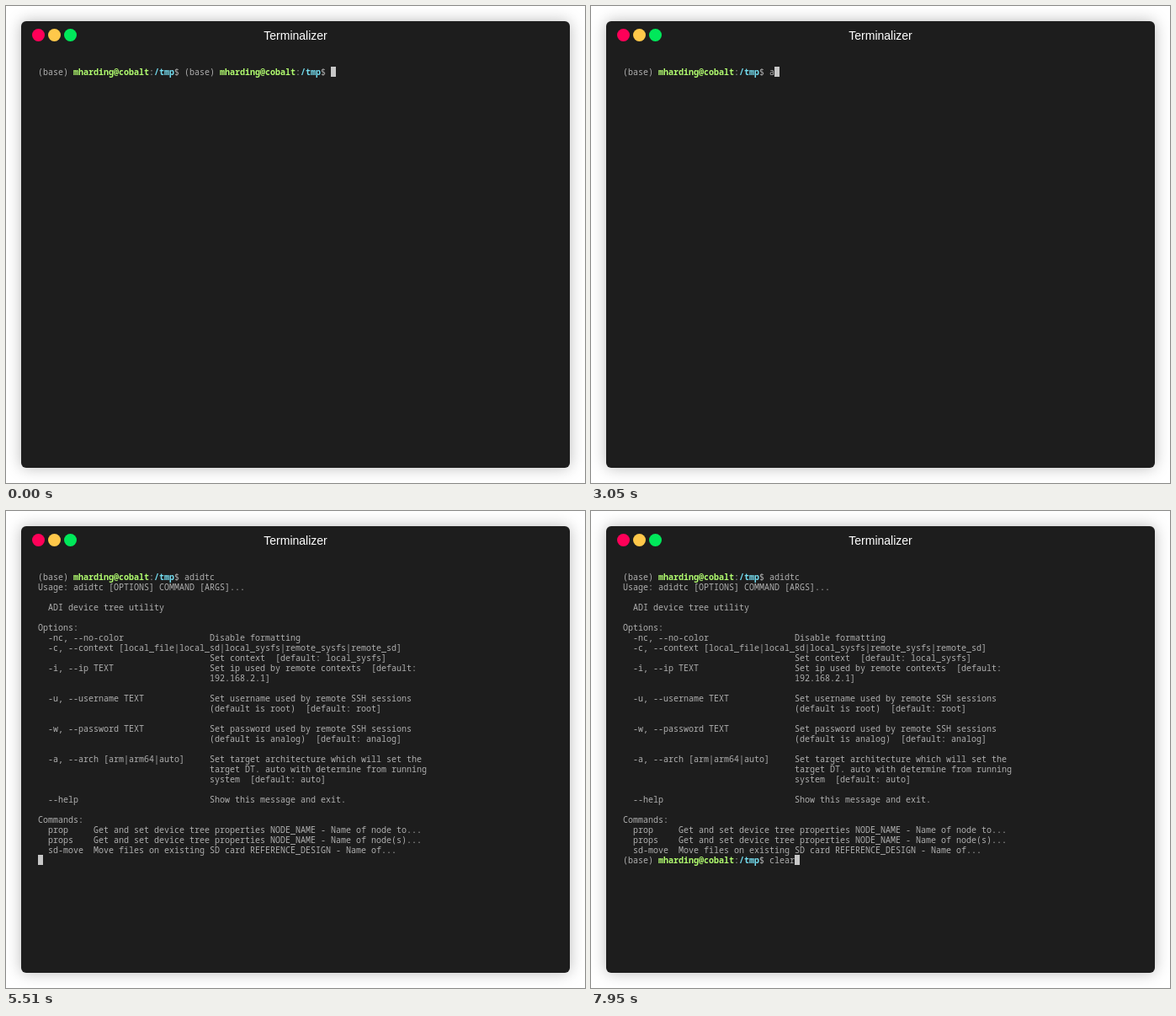
Animation of 688 by 566 pixels, one loop 8 s. Source, as an HTML page:

```html
<!DOCTYPE html>
<html lang="en">
<head>
<meta charset="utf-8">
<title>Terminal</title>
<style>
  html, body { margin: 0; width: 100%; height: 100%; overflow: hidden; background: #fff; }
  #window {
    position: absolute; left: 18px; top: 18px; width: 652px; height: 530px;
    border-radius: 6px; background: #1d1d1d; box-shadow: 0 0 18px #bbb;
  }
  .dot { position: absolute; top: 9px; width: 15px; height: 15px; border-radius: 50%; }
  #title {
    position: absolute; top: 9px; width: 100%; text-align: center; color: #fff;
    font: 14px/16px "Liberation Sans", Arial, sans-serif;
  }
  #screen {
    position: absolute; left: 20px; top: 54px; margin: 0; color: #afafaf;
    font: 10px/12px "Noto Sans Mono", monospace; font-variant-ligatures: none;
  }
  .user { color: #b1fc6f; }
  .path { color: #75dff2; }
  #cursor { position: absolute; width: 6px; height: 12px; background: #c7c7c7; }
</style>
</head>
<body>
<div id="window">
  <div class="dot" style="left:13px;background:#ff0058"></div>
  <div class="dot" style="left:32px;background:#ffc84a"></div>
  <div class="dot" style="left:51px;background:#00e85a"></div>
  <div id="title">Terminalizer</div>
  <pre id="screen"></pre>
  <div id="cursor"></div>
</div>
<script>
const LOOP = 8000;
const prompt = '(base) <b class="user">mharding@cobalt</b>:<b class="path">/tmp</b>$ ';
const option = (name, help = "") => ("  " + name).padEnd(34) + help;
const command = (name, help) => ("  " + name).padEnd(11) + help;

const usage = [
  "Usage: adidtc [OPTIONS] COMMAND [ARGS]...",
  "",
  "  ADI device tree utility",
  "",
  "Options:",
  option("-nc, --no-color", "Disable formatting"),
  "  -c, --context [local_file|local_sd|local_sysfs|remote_sysfs|remote_sd]",
  option("", "Set context  [default: local_sysfs]"),
  option("-i, --ip TEXT", "Set ip used by remote contexts  [default:"),
  option("", "192.168.2.1]"),
  "",
  option("-u, --username TEXT", "Set username used by remote SSH sessions"),
  option("", "(default is root)  [default: root]"),
  "",
  option("-w, --password TEXT", "Set password used by remote SSH sessions"),
  option("", "(default is analog)  [default: analog]"),
  "",
  option("-a, --arch [arm|arm64|auto]", "Set target architecture which will set the"),
  option("", "target DT. auto with determine from running"),
  option("", "system  [default: auto]"),
  "",
  option("--help", "Show this message and exit."),
  "",
  "Commands:",
  command("prop", "Get and set device tree properties NODE_NAME - Name of node to..."),
  command("props", "Get and set device tree properties NODE_NAME - Name of node(s)..."),
  command("sd-move", "Move files on existing SD card REFERENCE_DESIGN - Name of..."),
  ""
].join("\n");

// Each step is [start time, screen content].
const steps = [];
const show = (time, text) => steps.push([time, text]);
const type = (before, word, times) =>
  times.forEach((time, i) => show(time, before + word.slice(0, i + 1)));

const entered = prompt + "adidtc\n";
const done = entered + usage;

show(0, prompt + prompt);
type(prompt + prompt, "clear", [500, 590, 680, 760, 850]);
show(1050, prompt);
type(prompt, "adidtc", [3050, 3160, 3340, 3630, 3940, 4230]);
show(5290, entered);
show(5510, done);
show(5540, done + prompt);
type(done + prompt, "clear", [7390, 7490, 7730, 7840, 7950]);

const screenEl = document.getElementById("screen");
const cursor = document.getElementById("cursor");
let current;

function draw(now) {
  const time = now % LOOP;
  const text = steps.findLast(step => step[0] <= time)[1];
  if (text !== current) {
    current = text;
    screenEl.innerHTML = text;
    const lines = screenEl.textContent.split("\n");
    cursor.style.left = 20 + 6 * lines.at(-1).length + "px";
    cursor.style.top = 54 + 12 * (lines.length - 1) + "px";
  }
}

const start = performance.now();
function tick() {
  draw(performance.now() - start);
  requestAnimationFrame(tick);
}
tick();
</script>
</body>
</html>
```
